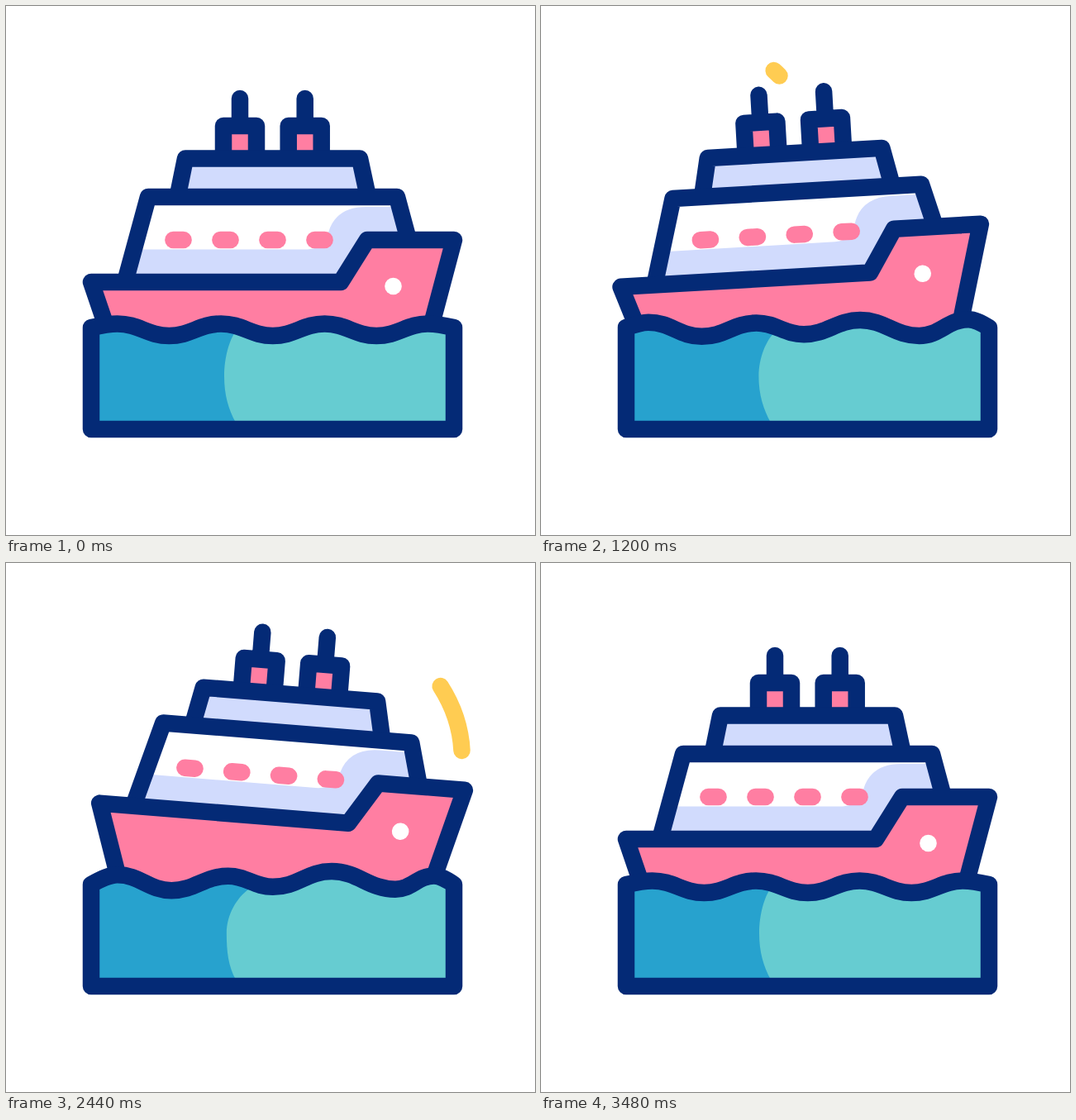
Animation of 640 by 640 pixels, one loop 3600 ms. Source, as an HTML page:

```html
<!DOCTYPE html>
<html lang="en">
<head>
<meta charset="utf-8">
<title>Ship at sea</title>
<style>
  html, body { margin: 0; width: 100%; height: 100%; overflow: hidden; background: #fff; }
  svg { display: block; width: 100vw; height: 100vh; }
  .line { fill: none; stroke-linecap: round; stroke-linejoin: round; stroke-width: 20.5; }
  .navy { stroke: #042a76; }
  .sun { stroke: #ffcc52; }
  .drop { stroke: #27a2ce; }
  .rose { stroke: #ff7ea2; }
  .pink { fill: #ff7ea2; }
  .pale { fill: #d1dbfd; }
</style>
</head>
<body>
<svg viewBox="0 0 640 640">
  <defs><clipPath id="seaClip"><path id="seaShape"/></clipPath></defs>
  <g id="arcs"></g>
  <g id="ship">
    <g id="funnels"></g>
    <path class="line navy pale" d="M207.5 231 L217 184.5 H428 L438 231"/>
    <path fill="#fff" d="M144 334 L172 231 H473 L487 283 L440 334Z"/>
    <path class="pale" d="M154 294.5 H365 Q387 293 390 274 Q399 243 436 243 H476 L487 283 L440 334 H144Z"/>
    <path class="line navy" d="M144 334 L172 231 H473 L487 283"/>
    <g id="windows"></g>
    <path class="line navy pink" d="M137 434 L103 334 H405 L437 283 H542 L502 434"/>
    <circle cx="468.5" cy="339" r="10.3" fill="#fff"/>
  </g>
  <g clip-path="url(#seaClip)">
    <rect x="93" y="340" width="460" height="180" fill="#27a2ce"/>
    <path id="teal" fill="#66ccd1"/>
  </g>
  <path id="seaLine" class="line navy"/>
  <g id="drops"></g>
</svg>
<script>
const LOOP = 3600, STEP = 20;
const $ = id => document.getElementById(id);
const clamp = v => Math.max(0, Math.min(1, v));
const mix = (a, b, p) => a + (b - a) * p;
const linear = p => p;
const easeOut = p => 1 - (1 - p) * (1 - p);
const sway = p => (1 - Math.cos(Math.PI * p)) / 2;

function add(parent, cls, d) {
  const el = document.createElementNS("http://www.w3.org/2000/svg", "path");
  el.setAttribute("class", cls);
  el.setAttribute("d", d);
  $(parent).appendChild(el);
  return el;
}

for (const x of [283, 361.7]) {
  add("funnels", "pink", `M${x - 20} 145 h40 v39 h-40Z`);
  add("funnels", "line navy", `M${x - 20} 184 V145 H${x + 20} V184 M${x} 112 V145`);
}
for (let i = 0; i < 4; i++) add("windows", "line rose", `M${202.4 + 57 * i} 283 h12.2`);

// Swings like a pendulum from one turning point [time, value] to the next.
const swing = (...turns) => t => turns.slice(1).reduce(
  (v, [time, value], i) => v + (value - turns[i][1]) * sway(clamp((t - turns[i][0]) / (time - turns[i][0]))),
  turns[0][1]);

const tilt = swing([160, 0], [610, 6], [1350, -4.3], [2030, 6.05], [3280, 0]);
const lift = swing([160, 0], [600, -23.2], [1485, -2], [2230, -28.5], [3400, 0]);
const swell = swing([160, 0], [580, 1], [1680, .8], [2400, 1.43], [3480, 0]);
const drift = swing([800, 0], [1680, 11], [2440, 0]);

// How far each crest and trough moves at full swell.
const pull = [[0, -5], [2, -2], [6, -4], [0, -5], [6, -8], [16, -3], [7, -6]];

function sea(k, d) {
  const nodes = pull.map(([px, py], i) => {
    const last = i === 6, f = last ? Math.min(k, 1) : k, s = last ? 0 : d;
    return [134.7 + 62.7 * i + f * px - s, (i % 2 ? 399 : 384.5) + f * py + .55 * s];
  });
  const [ax, ay] = nodes[0], [zx, zy] = nodes[6];
  let path = `M103 512 V389 C${mix(103, ax, .4)} ${mix(389, ay, .6)} ${mix(ax, 103, .3)} ${ay} ${ax} ${ay}`;
  for (let i = 1; i < 7; i++) {
    const [x0, y0] = nodes[i - 1], [x1, y1] = nodes[i], h = (x1 - x0) * .42;
    path += ` C${x0 + h} ${y0} ${x1 - h} ${y1} ${x1} ${y1}`;
  }
  return path + ` C${mix(zx, 542, .3)} ${zy} ${mix(542, zx, .4)} ${mix(389, zy, .6)} 542 389 V512 Z`;
}

function teal(k, d) {
  const top = 277 + 11.5 * k - d, mid = 264 + 2 * k - d / 2;
  return `M${top} 395 C${(top + mid) / 2} 404 ${mid} 425 ${mid} 448 `
    + `C${mid} 470 269 488 278 504 V520 H552 V350 H${top + 10}Z`;
}

// A stroke that grows from its start, then shrinks into its end.
const trails = [];
function trail(group, cls, d, t, rule) {
  const el = add(group, "line " + cls, d);
  trails.push({ el, t, size: el.getTotalLength(), ...rule });
}
const ARC = { grow: 420, wait: 435, shrink: 395, life: 867, ease: linear };
const DROP = { grow: 165, wait: 150, shrink: 220, life: 375, ease: easeOut };
const arc = (t, d) => trail("arcs", "sun", d, t, ARC);
const drop = (t, d) => trail("drops", "drop", d, t, DROP);

arc(383, "M75 179 C78 137 106 95 148 70 C190 45 245 40 288.5 84.5");
arc(2312, "M551.5 227 C550 198 540 171 525 148 C493 102 432 78 358 78");

for (const t of [500, 2460]) {
  drop(t, "M556 342 L587 315");
  drop(t + 55, "M526.5 309 Q529 294 535 278.5");
  drop(t + 55, "M580.5 379.5 L609 380.5");
}
drop(1390, "M84 345 Q70 336 58 319.5");
drop(1410, "M55 377 Q35 374 11.5 363");
drop(1427, "M121 335 Q121.5 320 124 306");

function drawTrail({ el, t, size, grow, wait, shrink, life, ease }, now) {
  const age = now - t, shown = age >= 0 && age < life;
  el.style.display = shown ? "" : "none";
  if (!shown) return;
  const from = Math.min(size * ease(clamp((age - wait) / shrink)), size - .05);
  const to = size * clamp(age / grow);
  el.setAttribute("stroke-dasharray", `${Math.max(.02, to - from)} ${size * 2}`);
  el.setAttribute("stroke-dashoffset", -from);
}

function draw(t) {
  $("ship").setAttribute("transform", `translate(0 ${lift(t)}) rotate(${tilt(t)} 322 453)`);
  const k = swell(t), d = drift(t), path = sea(k, d);
  $("seaShape").setAttribute("d", path);
  $("seaLine").setAttribute("d", path);
  $("teal").setAttribute("d", teal(k, d));
  trails.forEach(tr => drawTrail(tr, t));
}

const start = performance.now();
function tick() {
  const t = (performance.now() - start) % LOOP;
  draw(Math.floor(t / STEP) * STEP);
  requestAnimationFrame(tick);
}
tick();
</script>
</body>
</html>
```
